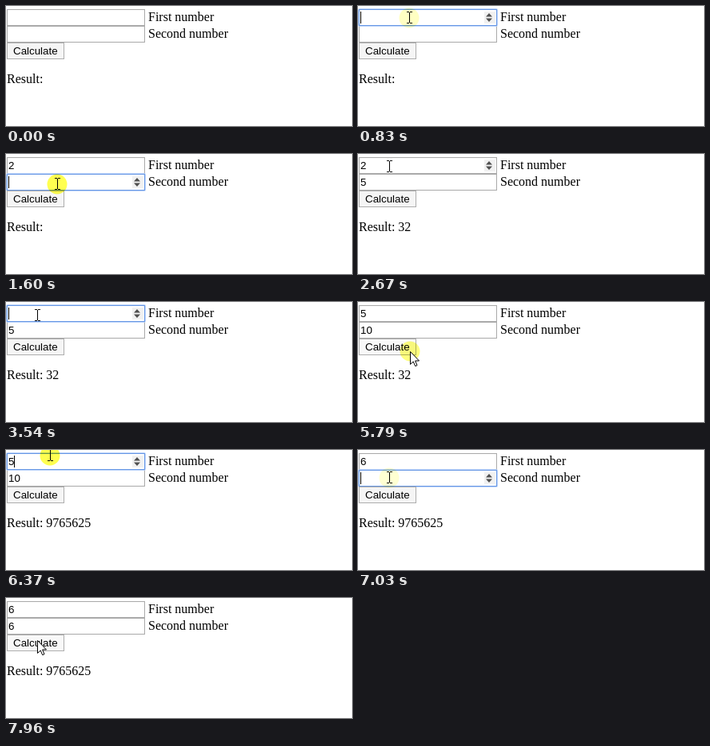
Animation, 433 px wide and 151 px high, one loop 7.99 s. Source, as an HTML page:

```html
<!DOCTYPE html>
<html lang="en">
<head>
<meta charset="utf-8">
<title>Power calculator</title>
<style>
html, body { margin: 0; width: 100%; height: 100%; overflow: hidden; background: #fff; }
svg { display: block; }
text { font: 16px "Liberation Serif", "Times New Roman", serif; white-space: pre; }
.ui { font: 13.333px "Liberation Sans", Arial, sans-serif; }
.box { fill: #fff; stroke: #a9a9a9; }
.ring { fill: none; stroke: #6797e4; }
.halo { stroke: #bdd4fa; }
.spin rect { fill: #f1f1f1; }
.spin path { fill: #505050; }
#glow { fill: #ff0; mix-blend-mode: multiply; }
</style>
</head>
<body>
<svg width="433" height="151" viewBox="0 0 433 151">
  <g id="fields"></g>
  <text x="178" y="19">First number</text>
  <text x="178" y="40">Second number</text>
  <rect id="button" x="1.5" y="46.5" width="71" height="20" stroke="#adadad"/>
  <text class="ui" x="9" y="61">Calculate</text>
  <text id="result" x="1" y="97"></text>
  <circle id="glow" r="12.5"/>
  <path id="beam" d="M-3-8h3v1h-3zM1-8h3v1h-3zM0-7h1v13h-1zM-3 6h3v1h-3zM1 6h3v1h-3z"/>
  <path id="arrow" d="M.5.5V16.5L4.2 13 6.7 18.7 9 17.7 6.6 12H11.5z" fill="#fff" stroke="#000"/>
</svg>
<script>
const LOOP = 7990, ENTER = 140, ROW = 21, BUTTON = 2;
const CLEAR = 150, KEY = 30, HOLD = 150, BLINK = 500, GLOW_DELAY = 40, GLOW = 250;

// Glide to a place, click there, then type into the field found there
const steps = [
  { move: [ENTER, 560], to: [64, 15], click: 620, type: 910, keys: "2" },
  { move: [960, 1500], to: [64, 38], click: 1540, type: 1750, keys: "5" },
  { move: [1780, 1930], to: [64, 60], click: 2160 },
  { move: [2300, 2670], to: [39, 16], click: 3180, type: 3590, keys: "5" },
  { move: [3450, 4400], to: [46, 39], click: 4350, type: 5100, keys: "10", tab: true },
  { move: [5510, 5650], to: [65, 62], click: 5670 },
  { move: [5950, 6270], to: [55, 7], click: 6310, type: 6600, keys: "6" },
  { move: [6550, 6780], to: [39, 35], click: 6800, type: 7170, keys: "6" },
  { move: [7180, 7310], to: [39, 53], click: 7930 }
];

const $ = id => document.getElementById(id);
const clamp = v => Math.min(1, Math.max(0, v));
const show = (el, on) => el.setAttribute("visibility", on ? "visible" : "hidden");
const rowAt = y => Math.floor((y - 4) / ROW);
for (const s of steps) s.row = rowAt(s.to[1]);

function pointer(t) {
  let x = 285, y = 150;
  for (const { move: [from, until], to } of steps) {
    const k = clamp((t - from) / (until - from)), ease = k * k * (3 - 2 * k);
    x += (to[0] - x) * ease;
    y += (to[1] - y) * ease;
  }
  return { x: Math.round(x), y: Math.round(y) };
}

function entry(row, t) {
  const s = steps.findLast(s => s.row === row && t >= s.type - CLEAR);
  if (!s) return { value: "", changed: 0 };
  const count = Math.min(s.keys.length, Math.max(0, Math.floor((t - s.type) / KEY) + 1));
  return { value: s.keys.slice(0, count), changed: count ? s.type + KEY * (count - 1) : s.type - CLEAR };
}

function result(t) {
  const s = steps.findLast(s => s.row === BUTTON && t >= s.click + HOLD);
  return s ? " " + entry(0, s.click).value ** entry(1, s.click).value : "";
}

$("fields").innerHTML = [0, 1].map(row => `<g transform="translate(0 ${ROW * row})">
  <rect class="box" x="1.5" y="4.5" width="172" height="20"/>
  <g class="spin"><rect x="158" y="7" width="14" height="15"/>
    <path d="M160 13.5L164 9 168 13.5zM160 15.5L164 20 168 15.5z"/></g>
  <text class="ui" x="3" y="19"></text>
  <rect class="caret" y="7" width="1" height="15"/>
  <g class="focus"><rect class="ring halo" x=".5" y="3.5" width="174" height="22" rx="1"/>
    <rect class="ring" x="1.5" y="4.5" width="172" height="20"/></g></g>`).join("");
const fields = [...$("fields").children];

function draw(t) {
  const p = pointer(t), entered = t >= ENTER;
  const hover = p.x >= 1 && p.x < 174 ? rowAt(p.y) : -1;
  const active = steps.findLast(s => t >= s.click);

  fields.forEach((g, row) => {
    const part = name => g.querySelector("." + name);
    const { value, changed } = entry(row, t), on = active?.row === row;
    const blinkAge = on ? t - Math.max(active.click, changed) : 0;
    part("ui").textContent = value;
    part("caret").setAttribute("x", Math.floor(3 + 7.42 * value.length));
    show(part("caret"), on && Math.floor(blinkAge / BLINK) % 2 === 0);
    show(part("focus"), on);
    show(part("spin"), on || entered && hover === row);
    // The focus ring lies above the neighbouring field
    if (on && g.nextSibling) $("fields").append(g);
  });

  $("button").setAttribute("fill", hover === BUTTON ? "#f8f8f8" : "#f5f5f5");
  $("result").textContent = "Result:" + result(t);

  const age = active && !active.tab ? t - active.click - GLOW_DELAY : -1;
  $("glow").setAttribute("opacity", age < 0 ? 0 : 0.75 * clamp(1 - age / GLOW));
  for (const id of ["glow", "beam", "arrow"]) $(id).setAttribute("transform", `translate(${p.x} ${p.y})`);
  const overText = hover === 0 || hover === 1;
  show($("beam"), entered && overText);
  show($("arrow"), entered && !overText);
}

const start = performance.now();
function tick() {
  draw((performance.now() - start) % LOOP);
  requestAnimationFrame(tick);
}
tick();
</script>
</body>
</html>
```
